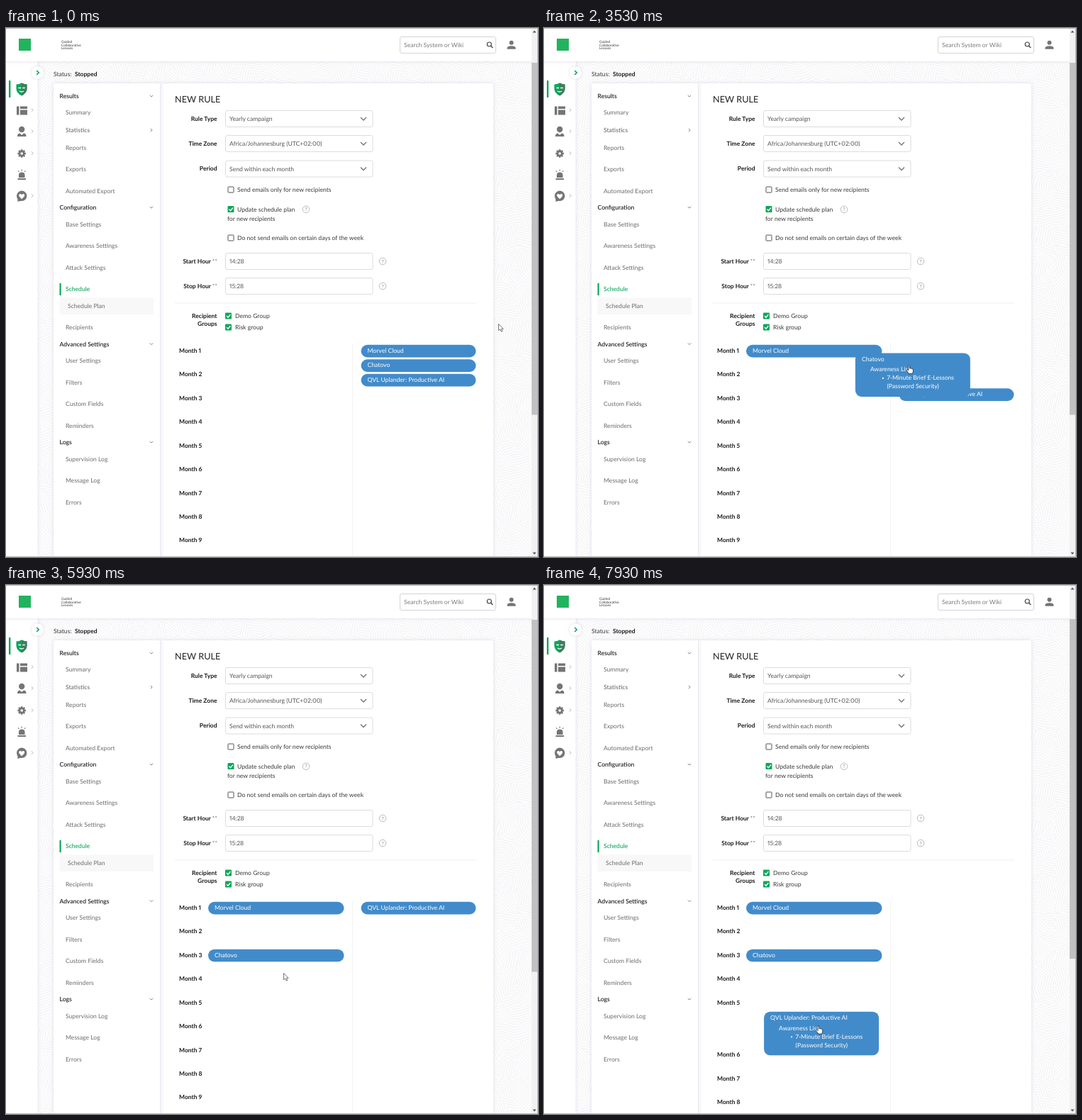
Recreate the animation shown at these times as an HTML page with a canvas. Size 750x746 px, loop 8 s.

```html
<!DOCTYPE html>
<html lang="en">
<head>
<meta charset="utf-8">
<title>Schedule planner</title>
<style>
  html, body { margin: 0; width: 100%; height: 100%; overflow: hidden; background: #fff; }
  canvas, svg { position: absolute; left: 0; top: 0; display: block; }
  text {
    font: 8.6px Lato, "Open Sans", sans-serif; font-variant-numeric: proportional-nums;
    fill: #3a3a3a; text-rendering: geometricPrecision; white-space: pre;
  }
  .nav { fill: #6c6c6c; }
  .mid { font-weight: 500; }
  .head { font-weight: 500; fill: #111; }
  .bold { font-weight: 700; font-size: 8.5px; fill: #1c1c1c; }
  .end { text-anchor: end; }
  .on { fill: #0da65a; font-weight: 500; }
  .title { font-size: 12.7px; fill: #222; }
  .tag { font-size: 4.8px; fill: #333; }
  .value { fill: #555; }
  .soft { fill: #7b7b7b; }
  .help { font-size: 7px; fill: #888; text-anchor: middle; }
  .card text { fill: #fff; }
  .card rect { fill: #428bca; }
</style>
</head>
<body>
<canvas id="bg" width="750" height="746"></canvas>
<svg id="stage" width="750" height="746" viewBox="0 0 750 746">
  <defs>
    <filter id="shade" x="-10%" y="-10%" width="120%" height="120%">
      <feDropShadow dx="0" dy="0" stdDeviation="2.5" flood-color="#9a9ac0" flood-opacity=".32"/>
    </filter>
  </defs>
  <g id="page"></g>
  <g id="months"></g>
  <g id="cards"></g>
  <g id="frame">
    <rect x="741" y="0" width="9" height="746" fill="#f1f1f1"/>
    <rect id="thumb" x="741" y="49" width="8" height="496.500" fill="#c1c1c1"/>
    <path d="M742.5 6.5l2.5-3 2.5 3zM742.5 739.5l2.5 3 2.5-3z" fill="#555"/>
    <path d="M0 .5H750M0 745.5H750M749.5 0V746" stroke="#b9b9b9" fill="none"/>
  </g>
  <path id="arrow" d="M0 0V9.2L2.2 7.3 3.8 10.7 5.3 10 3.8 6.8H6.6Z" fill="#fff" stroke="#555" stroke-width=".8"/>
  <path id="hand" d="M-.9 .8Q0-.6 .9 .8V4.6Q1.8 3.8 2.6 4.9 3.6 4.2 4.2 5.3 5.5 4.9 5.7 6.3V8.6Q5.6 10 4.7 12H-.5Q-1.6 9.8-3.6 7.6-3.9 6.1-2.4 6.3L-.9 7.5Z"
    fill="#fff" stroke="#222" stroke-width=".8"/>
</svg>
<script>
const $ = id => document.getElementById(id);

// Hatched wallpaper
function wallpaper() {
  const c = $('bg').getContext('2d'), size = 26;
  let seed = 11;
  const rnd = () => (seed = seed * 16807 % 2147483647) / 2147483647;
  c.fillStyle = '#fdfdfe';
  c.fillRect(0, 0, 750, 746);
  c.strokeStyle = '#f1f1f3';
  c.lineWidth = .9;
  const hatch = (x, y, corners) => {
    c.save();
    c.beginPath();
    corners.forEach(([a, b]) => c.lineTo(x + a * size, y + b * size));
    c.clip();
    c.translate(x + size / 2, y + size / 2);
    c.rotate(Math.floor(rnd() * 6) * Math.PI / 6 + .2);
    c.beginPath();
    for (let i = -20; i <= 20; i += 3.4) { c.moveTo(-20, i); c.lineTo(20, i); }
    c.stroke();
    c.restore();
  };
  for (let y = 46; y < 746; y += size)
    for (let x = 44; x < 742; x += size) {
      if (x > 80 && x < 650 && y > 80) continue;
      const flip = rnd() < .5;
      hatch(x, y, flip ? [[0, 0], [1, 0], [0, 1]] : [[0, 0], [1, 0], [1, 1]]);
      hatch(x, y, flip ? [[1, 0], [1, 1], [0, 1]] : [[0, 0], [1, 1], [0, 1]]);
    }
}

// Markup helpers; y is the middle of the text line
const text = (x, y, s, cls = '') => `<text x="${x}" y="${y + 3}" class="${cls}">${s}</text>`;
const rect = (x, y, w, h, fill, more = '') => `<rect x="${x}" y="${y}" width="${w}" height="${h}" fill="${fill}" ${more}/>`;
const line = (d, color, w = 1) => `<path d="${d}" fill="none" stroke="${color}" stroke-width="${w}"/>`;
const shape = (d, fill) => `<path d="${d}" fill="${fill}" fill-rule="evenodd"/>`;
const dot = (x, y, r, fill, more = '') => `<circle cx="${x}" cy="${y}" r="${r}" fill="${fill}" ${more}/>`;
const down = (x, y, r, color, w) => line(`M${x - r} ${y - r / 2}l${r} ${r} ${r} ${-r}`, color, w);
const right = (x, y, r, color, w) => line(`M${x - r / 2} ${y - r}l${r} ${r} ${-r} ${r}`, color, w);
const help = (x, y) => dot(x, y, 4.8, '#fff', 'stroke="#aaa" stroke-width=".8"') + text(x, y - .4, '?', 'help');
const box = (y, s) => rect(309.5, y - 11.5, 207.5, 23, '#fff', 'rx="2.5" stroke="#dcdcdc"') + text(315, y, s, 'value');
const select = (y, s) => box(y, s) + down(504, y, 4, '#757575', 1.4);
const check = (x, y, on) => on
  ? rect(x, y - 4.5, 9, 9, '#0da65a', 'rx="1"') + line(`M${x + 2} ${y}l2 2.2 3.4-4.2`, '#fff', 1.3)
  : rect(x + .5, y - 4, 8, 8, '#fff', 'rx=".8" stroke="#555"');

function sidebar() {
  const grey = '#757575';
  const teeth = [0, 45, 90, 135].map(a => rect(20.9, 171.2, 2.6, 11.6, grey, `transform="rotate(${a} 22.2 177)"`)).join('');
  return rect(0, 40, 44.5, 706, '#fff', 'filter="url(#shade)"')
    + rect(4, 74, 2.4, 24, '#0da65a')
    + shape('M22 77.5Q26 79.5 29.5 79.5V86Q29 92 22 95.5 15 92 14.5 86V79.5Q18 79.5 22 77.5Z', '#0da65a')
    + shape('M22 77.5Q26 79.5 29.5 79.5V86Q29 92 22 95.5Z', '#3d7f5e')
    + line('M17.5 84.5h3.6M23.2 84.5h3.6M19 89q3 2 6 0', '#fff', 1.5)
    + shape('M15 110.5h3.5v12H15zM20 110.5h10v3.5H20zM20 115.5h10v7H20z', grey)
    + dot(22.2, 143, 4.2, grey) + shape('M16 153Q16 148.5 19.5 148.5L22.2 151 25 148.5Q28.5 148.5 28.5 153Z', grey)
    + teeth + dot(22.2, 177, 4.4, grey) + dot(22.2, 177, 1.8, '#fff')
    + shape('M18 211V207Q18 203.5 22.2 203.5 26.5 203.5 26.5 207V211ZM16.5 212h11.5v2H16.5z', grey)
    + line('M22.2 199.5v2.3M17 201.3l1.5 1.7M27.4 201.3l-1.5 1.7', grey, 1.1)
    + dot(22.2, 236.8, 7.2, grey) + shape('M16.5 240v5l5-1.5z', grey)
    + shape('M22.2 241.2l-3.6-3.8q-1.2-2.5 1-3.4 1.7-.3 2.6 1.3.9-1.6 2.6-1.3 2.2.9 1 3.4z', '#fff')
    + [116, 146, 177, 237].map(y => right(37, y - .5, 2.2, '#aaa', .9)).join('')
    + dot(44.5, 63, 8.5, '#fff', 'filter="url(#shade)"') + right(44.7, 63, 3, '#0da65a', 1.7);
}

function header() {
  return rect(-5, -5, 760, 52, '#fff', 'filter="url(#shade)"')
    + rect(18, 15, 17, 17, '#22b35e')
    + ['Guided', 'Collaborative', 'Lessons'].map((s, i) => text(78, 17.8 + i * 4.7, s, 'tag')).join('')
    + rect(555.5, 12.5, 135, 23, '#fff', 'rx="2.5" stroke="#d4d4d4"')
    + text(561, 23.5, 'Search System or Wiki', 'soft')
    + dot(681.3, 23, 3, 'none', 'stroke="#444" stroke-width="1.2"') + line('M683.5 25.3l2.8 2.8', '#444', 1.4)
    + dot(712.5, 20.8, 3, '#757575') + shape('M706.5 29.8V28Q707 25.2 712.5 25.2 718 25.2 718.5 28V29.8Z', '#757575');
}

function menu() {
  const heads = { Results: 96, Configuration: 253, 'Advanced Settings': 445.5, Logs: 584 };
  const items = {
    Summary: 119, Reports: 168.5, Exports: 199, 'Automated Export': 229.5,
    'Base Settings': 276.5, 'Awareness Settings': 307, 'Attack Settings': 337.5, Recipients: 422,
    'User Settings': 469, Filters: 499.5, 'Custom Fields': 530, Reminders: 560.5,
    'Supervision Log': 607.5, 'Message Log': 638, Errors: 668.5
  };
  return Object.entries(heads).map(([s, y]) => text(75.5, y, s, 'head') + down(205, y, 2.2, '#777', .9)).join('')
    + Object.entries(items).map(([s, y]) => text(84, y, s, 'nav')).join('')
    + text(84, 144, 'Statistics', 'nav mid') + right(205, 144, 2.2, '#777', .9)
    + rect(75.5, 360, 2.2, 17, '#0da65a') + text(84, 368, 'Schedule', 'on')
    + rect(75.5, 380.5, 132.5, 23.5, '#f8f8f8') + text(87, 391.5, 'Schedule Plan', 'nav');
}

function form() {
  const labels = { 'Rule Type': 127.5, 'Time Zone': 162.5, Period: 198, Recipient: 405.5, Groups: 417 };
  const hour = (y, s, value) => text(289, y, s, 'bold end') + text(290.5, y, '**', 'soft') + box(y, value) + help(531, y);
  return text(238, 102.2, 'NEW RULE', 'title')
    + Object.entries(labels).map(([s, y]) => text(297.5, y, s, 'bold end')).join('')
    + select(128, 'Yearly campaign') + select(163, 'Africa/Johannesburg (UTC+02:00)')
    + select(198.5, 'Send within each month')
    + check(312.5, 228) + text(326, 228, 'Send emails only for new recipients')
    + check(312.5, 255.5, 1) + text(326, 255.5, 'Update schedule plan') + help(423, 255.8)
    + text(312, 268.5, 'for new recipients')
    + check(312.5, 296) + text(326, 296, 'Do not send emails on certain days of the week')
    + hour(329, 'Start Hour', '14:28') + hour(364, 'Stop Hour', '15:28')
    + rect(238, 387.5, 425, 1, '#f0f0f0')
    + check(309, 406, 1) + text(323, 406, 'Demo Group')
    + check(309, 422, 1) + text(323, 422, 'Risk group')
    + rect(488, 446, 1, 300, '#f3f3f3');
}

wallpaper();
$('page').innerHTML = sidebar() + header()
  + text(67, 65, 'Status:') + text(97, 65, 'Stopped', 'bold')
  + rect(67, 78, 620, 680, '#fff', 'rx="3" filter="url(#shade)"')
  + rect(217, 78, 1.5, 668, '#e9e9f1') + rect(218.5, 78, 3, 668, '#f8f8fb')
  + menu() + form();

const listTop = 446.8;
const monthY = n => 455 + (n - 1) * 33.43;
$('months').innerHTML = Array.from({ length: 9 }, (_, i) => text(244, monthY(i + 1), `Month ${i + 1}`, 'bold')).join('');
const months = [...$('months').children];

$('cards').innerHTML = ['Morvel Cloud', 'Chatovo', 'QVL Uplander: Productive AI'].map(name =>
  `<g class="card"><rect rx="8.8"/>${text(9, 8.2, name)}<g>${text(21, 23, 'Awareness List:')}${dot(39, 35.5, 1.1, '#fff')}`
  + `${text(44.5, 35, '7-Minute Brief E-Lessons')}${text(44.5, 47, '(Password Security)')}</g></g>`).join('');
const cards = [...$('cards').children];

// Ticks run at 15 per second.
// r: right list, m: in a month, d: dragged over a month, h: dragged from the list; capital: opened
const states = [
  [0, 'r r r'], [6, 'R r r'], [15, 'h r r'], [20, 'd1 r r'], [30, 'M1 r r'], [36, 'm1 R r'],
  [48, 'm1 h r'], [57, 'm1 d2 r'], [81, 'm1 d3 r'], [85, 'm1 M3 r'], [87, 'm1 m3 r'],
  [98, 'm1 m3 R'], [105, 'm1 m3 h'], [111, 'm1 m3 d3'], [113, 'm1 m3 d4'], [118, 'm1 m3 d5']
];
const path = [
  [0, 694, 417], [7, 598, 456], [14, 598, 456], [19, 487, 459], [24, 391, 463], [33, 391, 463],
  [38, 583, 463], [47, 583, 463], [60, 435, 490], [62, 429, 491], [70, 396.5, 533], [73, 396.5, 533],
  [77, 396.5, 542], [79, 396.5, 542], [82, 396.5, 558], [85, 396.5, 558], [89, 391, 547],
  [97, 577, 459], [99, 577, 463], [104, 577, 463], [109, 493, 515], [117, 389, 616], [119, 387, 621]
];
const grips = [[98, 10], [81.5, 16], [77.4, 18]];

function pointer(tick) {
  const i = Math.max(1, path.findIndex(p => p[0] >= tick));
  const [t0, x0, y0] = path[i - 1], [t1, x1, y1] = path[i];
  const f = Math.max(0, (tick - t0) / (t1 - t0));
  return [x0 + (x1 - x0) * f, y0 + (y1 - y0) * f];
}

const move = (el, x, y) => el.setAttribute('transform', `translate(${x} ${y})`);
const show = (el, on) => { el.style.display = on ? '' : 'none'; };
const size = (el, w, h) => { el.setAttribute('width', w); el.setAttribute('height', h); };

function draw(tick) {
  const slots = states.filter(s => s[0] <= tick).pop()[1].split(' ');
  let listY = listTop, after = 99, gap = 0;
  slots.forEach((slot, i) => {
    const kind = slot[0], month = +slot[1], card = cards[i];
    const held = kind === 'h' || kind === 'd';
    const open = held || kind === 'R' || kind === 'M';
    let x = 500.5, y = listY, w = 162;
    if (held) {
      // A dragged card trails the pointer by half a tick
      const [px, py] = pointer(tick - .5);
      x = px - grips[i][0];
      y = py - grips[i][1];
      $('cards').append(card);
    } else if (month) {
      x = 285;
      y = listTop + monthY(month) - monthY(1);
      w = 191.5;
    }
    if (!month) listY += kind === 'h' ? 61.5 : open ? 64.5 : 20.5;
    if (month && open) { after = month; gap = held ? 40 : 43.5; }
    move(card, x, y);
    size(card.firstChild, w, open ? 61.5 : 17.6);
    show(card.lastChild, open);
  });
  months.forEach((m, i) => move(m, 0, i + 1 > after ? gap : 0));
  $('thumb').setAttribute('y', gap ? 48 : 49);
  size($('thumb'), 8, gap ? 479 : 496.5);

  const grab = slots.some(s => /[RMhd]/.test(s)), [px, py] = pointer(tick);
  show($('hand'), grab);
  show($('arrow'), !grab);
  move($('hand'), px, py);
  move($('arrow'), px + .5, py + .5);
}

const start = performance.now();
function loop() {
  const t = (performance.now() - start) % 8000;
  draw(Math.min(119, Math.floor(t * .015 + .06)));
  requestAnimationFrame(loop);
}
loop();
</script>
</body>
</html>
```
